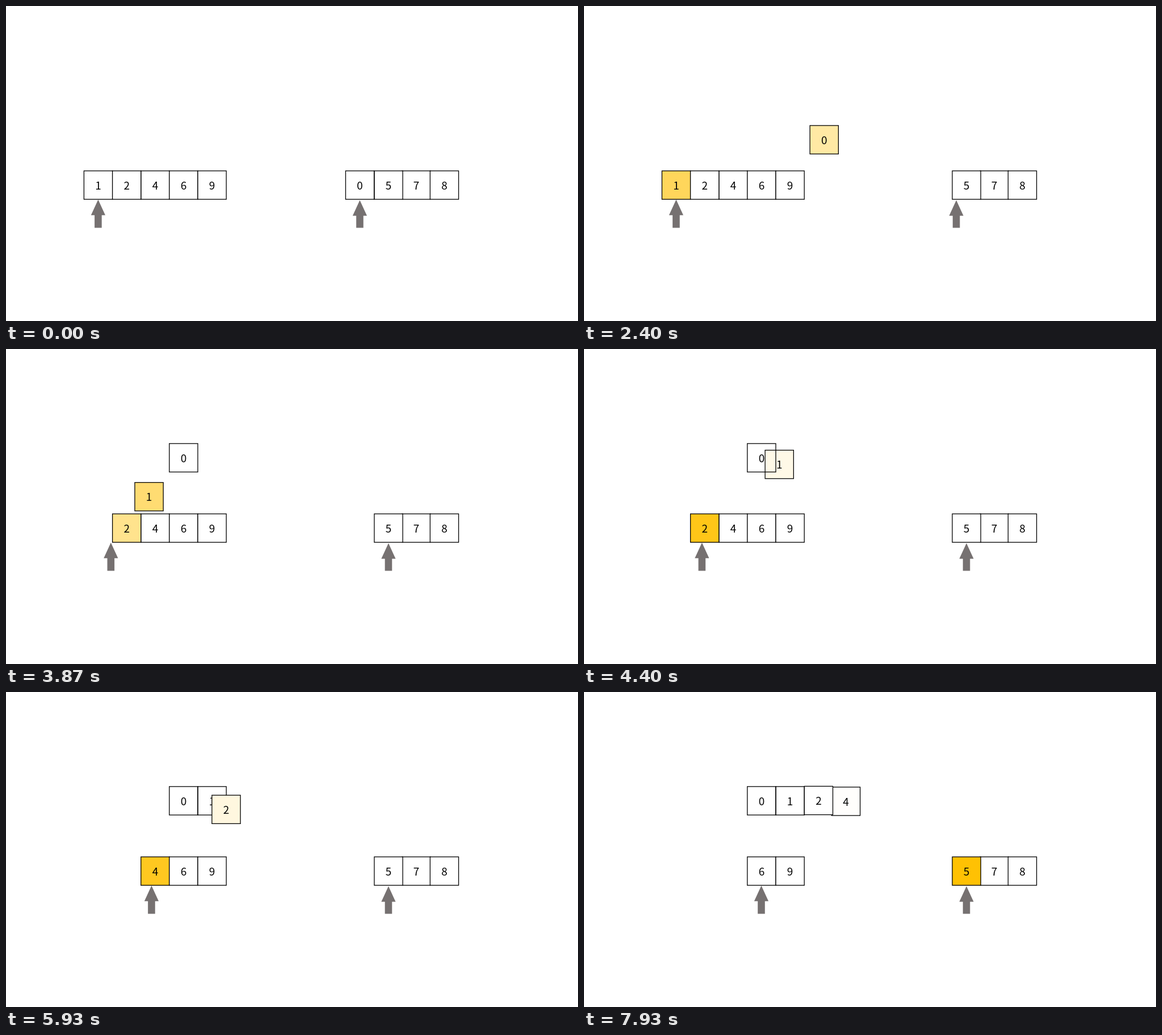
An HTML page with a canvas for the animation above (8000 ms loop, 1008x556 px).

```html
<!DOCTYPE html>
<html lang="en">
<head>
<meta charset="utf-8">
<title>Merging two sorted lists</title>
<style>
  html, body { margin: 0; width: 100%; height: 100%; overflow: hidden; background: #fff; }
  canvas { display: block; }
</style>
</head>
<body>
<canvas id="stage" width="1008" height="556"></canvas>
<script>
const ctx = document.getElementById('stage').getContext('2d');
const LOOP = 8000, FPS = 15, SPAN = 23;  // SPAN: length of a step, in ticks
const SIZE = 50.2, ROW = 291, TOP = 166.9;
const STEPS = [4, 26.4, 51, 75, 99];     // ticks at which the steps begin

// Listed from back to front. "lit" is the step that colours the tile;
// the following step carries it to (tx, ty) while the colour fades.
const tiles = [
  { n: 4, x: 237.8, lit: 3, tx: 438.4, ty: 166.6 },
  { n: 1, x: 137.4, lit: 1, tx: 338, ty: TOP },
  { n: 2, x: 187.6, lit: 2, tx: 388.3, ty: 166.4 },
  { n: 6, x: 287.8 },
  { n: 9, x: 338 },
  { n: 7, x: 698 },
  { n: 5, x: 649, lit: 4 },
  { n: 8, x: 747.4 },
  { n: 0, x: 598.5, lit: 0, tx: 287.8, ty: TOP, clear: true }
];

const mix = (a, b, p) => a + (b - a) * p;

// Quick start, long soft landing
function ease(t) {
  t = Math.min(1, Math.max(0, t));
  const u = 1.778 * t - 0.83 * t * t + 0.052 * t ** 6;
  return u * u * (3 - 2 * u);
}

function progress(tick, step) {
  return step in STEPS ? ease((tick - STEPS[step]) / SPAN) : 0;
}

function drawTile(tile, tick) {
  const glow = progress(tick, tile.lit);
  const move = progress(tick, tile.lit + 1);
  const x = mix(tile.x, tile.tx ?? tile.x, move);
  const y = mix(ROW, tile.ty ?? ROW, move);
  const tint = move > 0 ? 1 - move : glow;

  ctx.fillStyle = tile.clear
    ? `rgba(255,192,0,${tint})`
    : `rgb(255,${mix(255, 192, tint)},${mix(255, 0, tint)})`;
  ctx.fillRect(x, y, SIZE, SIZE);
  ctx.strokeRect(x, y, SIZE, SIZE);
  ctx.fillStyle = '#000';
  ctx.fillText(tile.n, x + SIZE / 2, y + 32.8);
}

function drawArrow(x, tip) {
  const neck = tip + 27.5, foot = 391.6;
  ctx.fillStyle = '#767171';
  ctx.beginPath();
  ctx.moveTo(x, tip);
  ctx.lineTo(x + 12.6, neck);
  ctx.lineTo(x + 6.3, neck);
  ctx.lineTo(x + 6.3, foot);
  ctx.lineTo(x - 6.3, foot);
  ctx.lineTo(x - 6.3, neck);
  ctx.lineTo(x - 12.6, neck);
  ctx.fill();
}

function draw(ms) {
  const tick = Math.floor(ms % LOOP * FPS / 1000 + 0.1);
  ctx.fillStyle = '#fff';
  ctx.fillRect(0, 0, 1008, 556);
  ctx.strokeStyle = '#000';
  ctx.lineWidth = 1.3;
  ctx.textAlign = 'center';
  ctx.font = '300 19px "Noto Sans CJK SC", "Noto Sans CJK JP", "Open Sans", sans-serif';

  for (const tile of tiles) drawTile(tile, tick);

  const taken = progress(tick, 2) + progress(tick, 3) + progress(tick, 4);
  drawArrow(162.4 + SIZE * taken, 341.8);
  drawArrow(mix(623.5, 674, progress(tick, 1)), 342.8);
}

let start;
function loop(now) {
  start ??= now;
  draw(now - start);
  requestAnimationFrame(loop);
}
draw(0);
requestAnimationFrame(loop);
</script>
</body>
</html>
```
